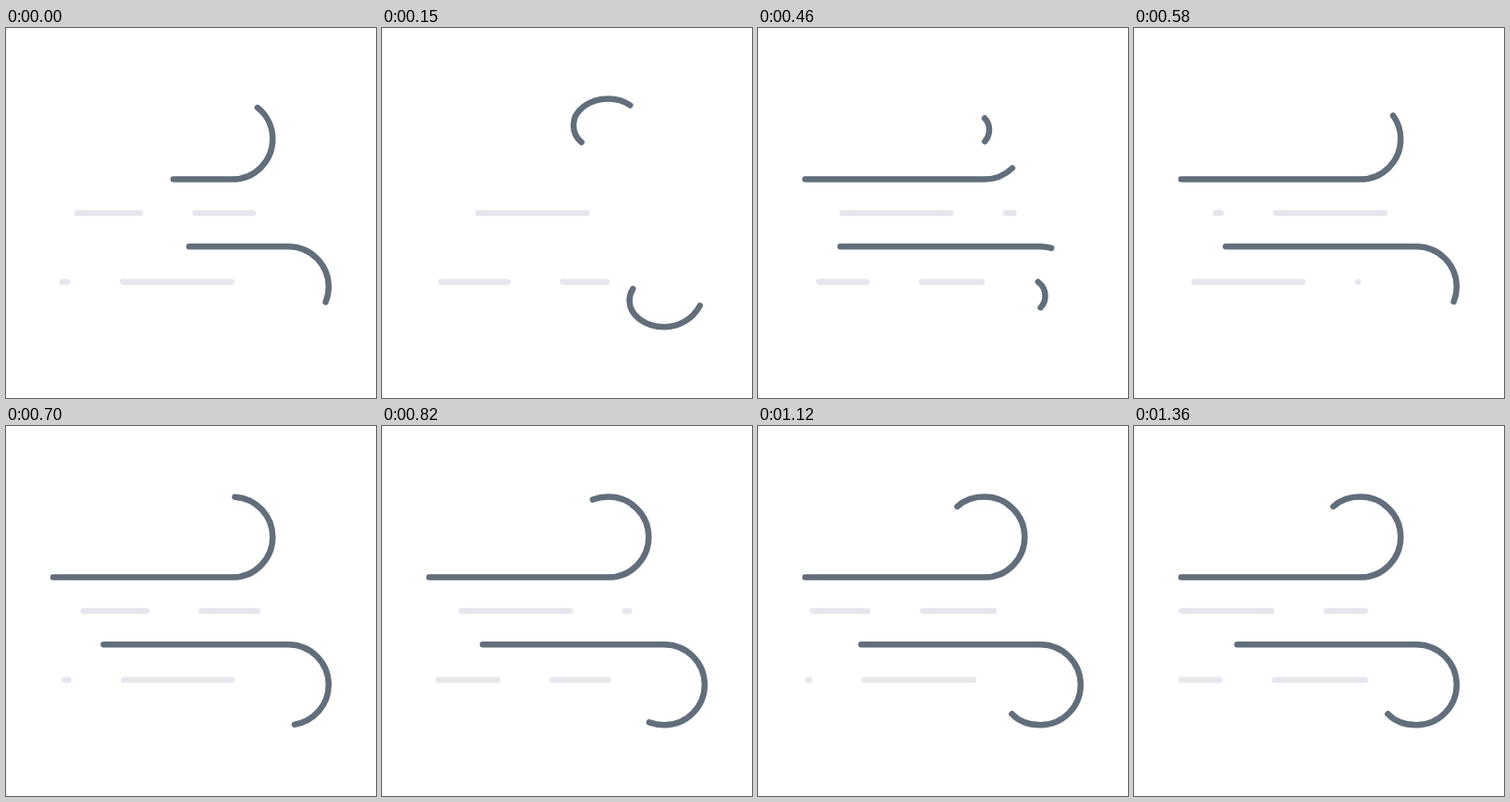
Recreate the animation shown at these times as an HTML page. Size 400 by 400 pixels, loop 1.43 s.

```html
<!DOCTYPE html>
<html lang="en">
<head>
<meta charset="utf-8">
<title>Wind</title>
<style>
  html, body { margin: 0; width: 100%; height: 100%; overflow: hidden; background: #fff; }
  svg { display: block; width: 100vw; height: 100vh; }
  path { fill: none; stroke-width: 6.5; stroke-linecap: round; }
  .gust { stroke: #636e7b; }
  .breeze { stroke: #e9e5ee; }
</style>
</head>
<body>
<svg id="stage" viewBox="0 0 400 400"></svg>
<script>
const LOOP = 1430, STEP = 30, LAST = 45;
const LEAD = 61; // extra straight run before the resting start of a gust
const CURL = `M${51 - LEAD} 163.6H244.8A43.5 43.5 0 0 1 244.8 76.6`
  .replace('0 0 1', '0 0 0') +
  'C223.8 76.6 207 89.3 207 105C207 118.3 217.7 129 231 129' +
  'C241.5 129 250 120.5 250 110C250 105 248 100.5 245 97.5';

const stage = document.getElementById('stage');

function addPath(cls, d, transform) {
  const p = document.createElementNS('http://www.w3.org/2000/svg', 'path');
  p.setAttribute('class', cls);
  if (d) p.setAttribute('d', d);
  if (transform) p.setAttribute('transform', transform);
  return stage.appendChild(p);
}

// Smooth monotone curve through [time, value] points, held at both ends.
function track(...pts) {
  const n = pts.length - 1;
  const sec = [];
  for (let i = 0; i < n; i++) {
    sec.push((pts[i + 1][1] - pts[i][1]) / (pts[i + 1][0] - pts[i][0]));
  }
  const m = [];
  for (let i = 1; i < n; i++) {
    const a = sec[i - 1], b = sec[i];
    m[i] = a * b > 0 ? 2 * a * b / (a + b) : 0;
  }
  m[0] = 1.5 * sec[0] - 0.5 * m[1];
  m[n] = Math.max(0, 1.5 * sec[n - 1] - 0.5 * m[n - 1]);
  return t => {
    if (t <= pts[0][0]) return pts[0][1];
    if (t >= pts[n][0]) return pts[n][1];
    let i = 0;
    while (t > pts[i + 1][0]) i++;
    const [t0, v0] = pts[i], [t1, v1] = pts[i + 1];
    const h = t1 - t0, u = (t - t0) / h, w = 1 - u;
    return v0 * w * w * (1 + 2 * u) + v1 * u * u * (3 - 2 * u) +
      h * u * w * (m[i] * w - m[i + 1] * u);
  };
}

const END = 463.8;
const MIRROR = 'translate(60.5 399.8) scale(1 -1)';
const grow = track([235, 0], [330, 107], [450, 227], [690, 327.5], [930, 358], [1110, 362]);
const slide = track([225, -61], [330, -42.5], [450, -22.5], [690, -6], [930, -0.8], [1110, 0]);

// Each gust: distance along the curl of its tail and head over time.
const gusts = [
  { tail: track([0, 130], [150, 305.5], [330, 400], [450, 436], [560, END]),
    head: track([0, 301], [150, 403.5], [330, 453], [450, END]) },
  { tail: () => 0, head: grow },
  { flip: true,
    tail: track([0, 86.5], [150, 283.4], [330, 391.5], [450, 432], [565, END]),
    head: track([0, 279], [150, 396], [330, 451], [450, END]) },
  { flip: true, tail: slide, head: t => slide(t) + grow(t) * 1.006 }
];
for (const g of gusts) g.el = addPath('gust', CURL, g.flip && MIRROR);

// Dashed lines whose ends sway while the dashes run to the right.
const breezes = [
  { y: 200.1, left: 40, right: 27, shift: 55.8 },
  { y: 274.6, left: 15, right: -8, shift: 0 }
];
for (const b of breezes) {
  b.el = addPath('breeze');
  b.el.setAttribute('stroke-dasharray', '117.5 59.8');
}

function draw(t) {
  for (const g of gusts) {
    const a = g.tail(t), len = g.head(t) - a;
    g.el.style.display = len > 0.2 ? '' : 'none';
    g.el.setAttribute('stroke-dasharray', `${Math.max(len, 0)} 2000`);
    g.el.setAttribute('stroke-dashoffset', -(a + LEAD));
  }
  const phase = Math.PI / 2000 * (t - 405);
  const sway = Math.cos(phase) ** 2;
  const run = 81.7 + 347.6 * Math.sin(phase);
  for (const b of breezes) {
    const x1 = 48 + b.left * sway, x2 = 253 + b.right * sway;
    b.el.setAttribute('d', `M${x1 + 3.25} ${b.y}H${x2 - 3.25}`);
    b.el.setAttribute('stroke-dashoffset', x1 - (x2 + run + b.shift));
  }
}

// Motion advances in fixed steps, with one slightly longer hold.
function tick() {
  const t = performance.now() % LOOP;
  const step = Math.floor((t < 370 ? t : t - 10) / STEP);
  draw(Math.min(step, LAST) * STEP);
  requestAnimationFrame(tick);
}
tick();
</script>
</body>
</html>
```
